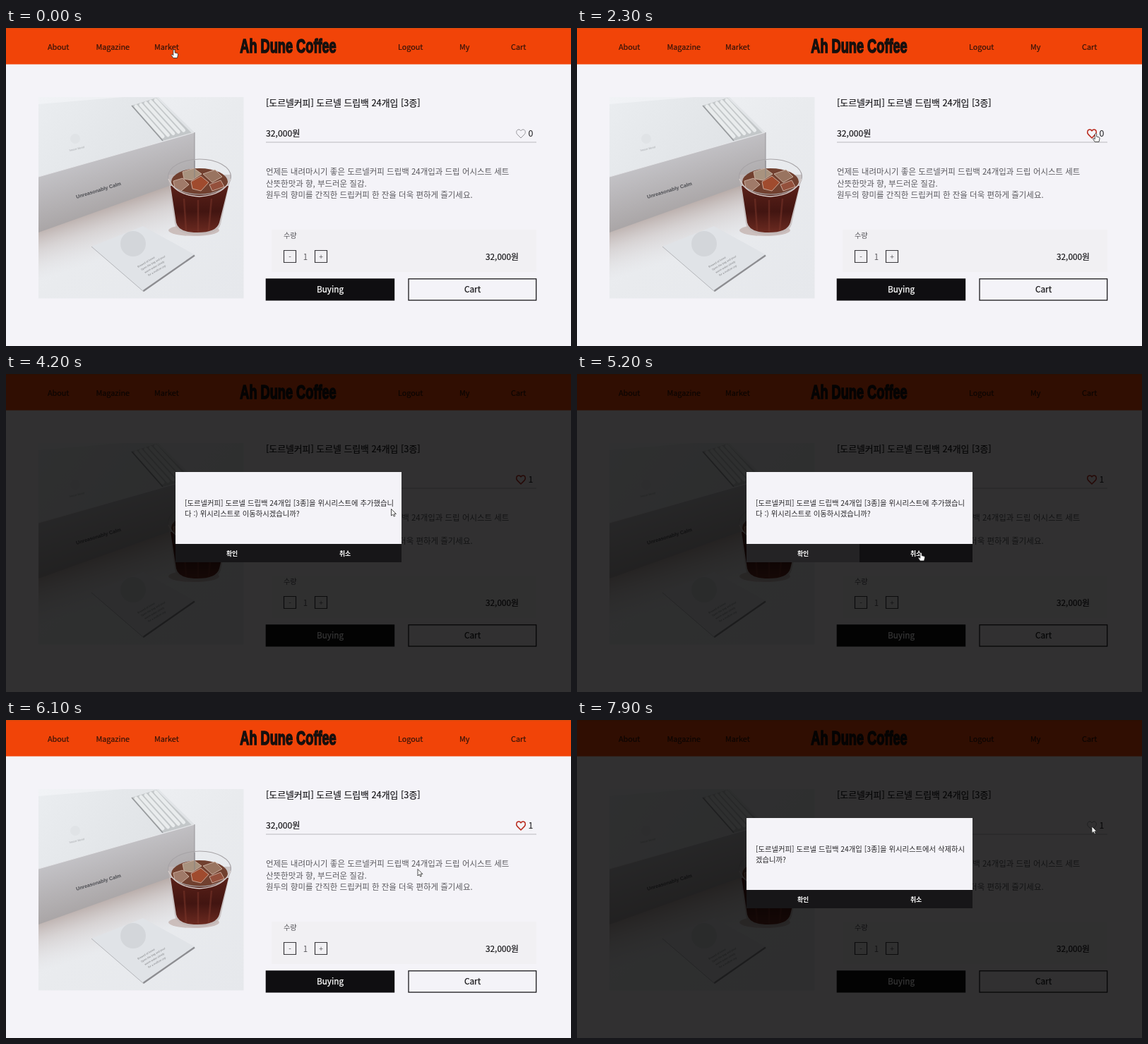
These frames come from a looping animation (800 by 451 pixels, 8 s). An HTML page:

```html
<!DOCTYPE html>
<html lang="ko">
<head>
<meta charset="utf-8">
<title>Coffee shop wishlist</title>
<style>
html, body { margin: 0; width: 100%; height: 100%; overflow: hidden; background: #f4f3f8; }
svg { display: block; width: 800px; height: 451px; }
text { font-family: "Noto Sans CJK KR", "Noto Sans CJK JP", "Noto Sans CJK", sans-serif; fill: #18171a; white-space: pre; }
.mid { text-anchor: middle; }
.nav { font-size: 10.8px; font-weight: 500; fill: #35140a; stroke: #35140a; stroke-width: .2; }
.logo { font: 700 28px "Liberation Sans", sans-serif; fill: #17100e; stroke: #17100e; stroke-width: 1.7; }
.title { font-size: 12.85px; font-weight: 500; stroke: #18171a; stroke-width: .2; }
.price { font-size: 12.2px; font-weight: 500; stroke: #18171a; stroke-width: .2; }
.desc { font-size: 11.48px; font-weight: 300; fill: #5b5a5f; }
.small { font-size: 10.2px; font-weight: 300; fill: #5b5a5f; }
.btn { font-size: 11.8px; font-weight: 500; stroke-width: .25; }
.print { font-family: "Liberation Sans", sans-serif; fill: #4c4d52; }
.msg { font-size: 10.35px; fill: #29282b; }
.choice { font-size: 8.8px; font-weight: 700; fill: #fff; }
</style>
</head>
<body>
<svg viewBox="0 0 800 451">
  <defs>
    <linearGradient id="table" x1="0" y1="0" x2="1" y2="1">
      <stop offset="0" stop-color="#f1f3f6"/><stop offset=".5" stop-color="#e9ebee"/><stop offset="1" stop-color="#e6e8ec"/>
    </linearGradient>
    <linearGradient id="lid" x1="0" y1="0" x2="1" y2=".4">
      <stop offset="0" stop-color="#eaedf0"/><stop offset="1" stop-color="#dfe2e5"/>
    </linearGradient>
    <linearGradient id="front" gradientUnits="userSpaceOnUse" x1="140" y1="180" x2="163" y2="252">
      <stop offset="0" stop-color="#c3c2c6"/><stop offset="1" stop-color="#aaa6a7"/>
    </linearGradient>
    <linearGradient id="shade" gradientUnits="userSpaceOnUse" x1="150" y1="250" x2="172" y2="318">
      <stop offset="0" stop-color="#b3a5a1" stop-opacity=".9"/><stop offset=".4" stop-color="#cbc3c2" stop-opacity=".6"/><stop offset="1" stop-color="#dcdadd" stop-opacity="0"/>
    </linearGradient>
    <linearGradient id="brew" x1="0" y1="0" x2="0" y2="1">
      <stop offset="0" stop-color="#5a2119"/><stop offset=".55" stop-color="#421511"/><stop offset="1" stop-color="#6b2a20"/>
    </linearGradient>
    <clipPath id="crop"><rect x="46" y="98" width="290.500" height="285.500"/></clipPath>
  </defs>

  <rect width="800" height="451" fill="#f4f3f8"/>
  <rect width="800" height="51.500" fill="#f14408"/>
  <rect width="800" height="1.5" fill="#dc4a0c"/>
  <g id="nav"></g>
  <text class="logo mid" transform="translate(399.5 35.2) scale(.65 1)">Ah Dune Coffee</text>

  <g clip-path="url(#crop)">
    <rect x="46" y="98" width="291" height="286" fill="url(#table)"/>
    <path d="M46 289L267 205 252 300 46 372Z" fill="url(#shade)"/>
    <path d="M46 108L178 97H215L267 148 46 211Z" fill="url(#lid)"/>
    <path d="M178 110L213 99 263 149 222 160Z" fill="#c3c7c9"/>
    <path d="M178 110L222 160" stroke="#94979a" stroke-width="1.4"/>
    <g id="bags" stroke="#e9eced" stroke-width="5" stroke-linecap="round"></g>
    <path d="M46 211L267 148V211L46 290Z" fill="url(#front)"/>
    <path d="M46 211L267 148" stroke="#e4e5e8" stroke-width="1.2"/>
    <path d="M267 148V211" stroke="#969498"/>
    <circle cx="98" cy="157" r="7" fill="#e0e3e6"/>
    <text class="print" font-size="4" transform="translate(90 175) rotate(-13)" fill-opacity=".4">house blend</text>
    <text class="print" font-size="7.1" font-weight="700" transform="translate(100 242) rotate(-17)">Unreasonably Calm</text>

    <ellipse cx="266" cy="287" rx="36" ry="8" fill="#a88a82" opacity=".45"/>
    <path d="M229 208L239 277Q242 293 271 293.500 300 293 304 278L319 208Z" fill="#c0b7b7" opacity=".75"/>
    <path d="M233 224L241 276Q244 290 271 290 298 290 302 276L315 224Z" fill="url(#brew)"/>
    <path d="M252 242L255 287M272 244V289M291 242L287 287" stroke="#7d372b" stroke-width="2.500" opacity=".5"/>
    <ellipse cx="274" cy="218" rx="40" ry="19" fill="#71402f"/>
    <g stroke="#d8bfb1" stroke-width=".8">
      <path d="M250 204L266 199 277 207 263 216 252 214Z" fill="#a8937f"/>
      <path d="M279 207L296 201 306 211 292 219Z" fill="#997460"/>
      <path d="M262 218L276 210 287 219 276 231 264 228Z" fill="#a04b2e"/>
      <path d="M237 217L250 213 259 222 248 231 239 227Z" fill="#a07a69"/>
      <path d="M288 222L304 216 309 225 292 231Z" fill="#94503c"/>
    </g>
    <ellipse cx="274" cy="211" rx="44.500" ry="25" fill="none" stroke="#a7a4a7" stroke-width="1.200"/>
    <path d="M230 214Q239 237 274 239 309 237 318 214" fill="none" stroke="#d9cfcd" stroke-width="1.300"/>
    <path d="M267 188V213" stroke="#817f84" stroke-width=".8"/>

    <path d="M121 310L194 281 268 322 195 374Z" fill="#e0e3e7"/>
    <path d="M121 310L195 374" stroke="#b3b5b9"/>
    <path d="M194.500 373L267 322.500" stroke="#8d8d91" stroke-width="2.400"/>
    <circle cx="180" cy="306" r="18" fill="#d3d6da"/>
    <g id="card" class="print" font-size="3.6"></g>
  </g>

  <text class="title" x="368" y="110.800">[도르넬커피] 도르넬 드립백 24개입 [3종]</text>
  <text class="price" x="368" y="154">32,000원</text>
  <path id="heart" d="M729 156L723.700 150.600C721.700 148 723 144 726 144 727.600 144 728.600 145 729 146 729.500 145 730.600 144 732.200 144 735.200 144 736.300 148 734.300 150.600Z" fill="none" stroke-linejoin="round"/>
  <text id="count" class="mid" x="743" y="154" font-size="12.400"></text>
  <path d="M368 162H751" stroke="#b9b8bd"/>
  <text class="desc" x="368" y="208">언제든 내려마시기 좋은 도르넬커피 드립백 24개입과 드립 어시스트 세트</text>
  <text class="desc" x="368" y="224.500">산뜻한맛과 향, 부드러운 질감.</text>
  <text class="desc" x="368" y="241">원두의 향미를 간직한 드립커피 한 잔을 더욱 편하게 즐기세요.</text>

  <rect x="376" y="286" width="375" height="60" fill="#f1f0f3"/>
  <text class="small" x="393" y="298">수량</text>
  <path d="M393.500 315.500H410.500V332.500H393.500ZM437.500 315.500H454.500V332.500H437.500Z" fill="none" stroke="#3c3b3f" stroke-width="1.200"/>
  <text class="small mid" x="402" y="327.500">-</text>
  <text class="desc mid" x="424" y="328.500">1</text>
  <text class="small mid" x="446" y="327.500">+</text>
  <text class="price" x="679" y="328.500" style="font-size:11.8px">32,000원</text>
  <rect x="367.700" y="355.300" width="182.500" height="31.300" fill="#0f0e11"/>
  <text class="btn mid" x="459" y="375" style="fill:#fff;stroke:#fff">Buying</text>
  <rect x="570" y="355.800" width="180.700" height="30.300" fill="none" stroke="#1b1a1d" stroke-width="1.300"/>
  <text class="btn mid" x="660.500" y="375" stroke="#18171a">Cart</text>

  <g id="modal">
    <rect width="800" height="451" fill="#000" opacity=".8"/>
    <rect x="240" y="139" width="320" height="102" fill="#f4f3f8"/>
    <text id="line1" class="msg" x="253" y="187"></text>
    <text id="line2" class="msg" x="253" y="202"></text>
    <rect id="yes" x="240" y="241" width="160" height="26"/>
    <rect id="no" x="400" y="241" width="160" height="26"/>
    <text class="choice mid" x="320" y="257.500">확인</text>
    <text class="choice mid" x="480" y="257.500">취소</text>
  </g>

  <g id="cursor" stroke="#222" stroke-width=".8" stroke-linejoin="round" fill="#fff">
    <path id="arrow" d="M0 0V9.500L2.200 7.500 3.800 10.600 5.300 9.900 3.900 6.900H6.900Z"/>
    <path id="hand" d="M-1.200 1Q0-.8 1.200 1V4.600L4.600 5.400Q5.800 5.900 5.500 7.600L4.500 12H-1.200L-3.900 8Q-3.700 6.600-2.500 7.200L-1.200 8.200Z"/>
  </g>
</svg>
<script>
const LOOP = 8000, STEP = 100;
const $ = id => document.getElementById(id);
const put = (id, markup) => { $(id).innerHTML = markup; };

put('nav', [['About', 59], ['Magazine', 127.5], ['Market', 210], ['Logout', 555], ['My', 642], ['Cart', 715]]
  .map(([word, x]) => `<text class="nav" x="${x}" y="30.5">${word}</text>`).join(''));

put('bags', [0, 1, 2, 3, 4]
  .map(i => `<path d="M${184 + i * 7} ${111 - i * 2.2}L${222 + i * 7.4} ${154 - i * 2.2}"/>`).join(''));

put('card', ['Brewed at home', 'Open the bag and pour', 'warm water slowly', 'for a mellow cup']
  .map((s, i) => `<text transform="translate(${187 + i * 5} ${340 + i * 4}) rotate(-30)" fill-opacity=".5">${s}</text>`).join(''));

const ITEM = '[도르넬커피] 도르넬 드립백 24개입 [3종]을 ';
const ADDED = [ITEM + '위시리스트에 추가했습니', '다 :) 위시리스트로 이동하시겠습니까?'];
const REMOVE = [ITEM + '위시리스트에서 삭제하시', '겠습니까?'];

// time, x, y of the pointer tip
const PATH = [
  [0, 238, 30.5], [400, 238, 30.5], [1200, 735, 152], [1300, 735, 152],
  [1500, 741, 151], [1600, 731, 150], [1700, 731, 150], [1900, 734.5, 149.5],
  [3100, 734.5, 149.5], [3200, 731, 150], [3900, 731, 150], [4500, 360, 233],
  [4600, 360, 233], [5200, 487, 253], [5300, 483, 253], [5700, 483, 253],
  [6500, 683, 170], [6600, 683, 170], [7100, 733, 150.5], [7500, 733, 150.5],
  [7600, 729, 151], [LOOP, 729, 151]
];

function pointer(t) {
  const i = PATH.findIndex(p => p[0] > t);
  const [t0, x0, y0] = PATH[i - 1], [t1, x1, y1] = PATH[i];
  const u = (t - t0) / (t1 - t0), k = u * u * (3 - 2 * u);
  return [x0 + (x1 - x0) * k, y0 + (y1 - y0) * k];
}

const inside = (x, y, l, t, r, b) => x >= l && x < r && y >= t && y < b;

function draw(now) {
  const t = Math.floor(now % LOOP / STEP) * STEP;
  const [x, y] = pointer(t);
  const removing = t >= 7600;
  const open = removing || (t >= 3200 && t < 5300);
  const onYes = open && inside(x, y, 240, 241, 400, 267);
  const onNo = open && inside(x, y, 400, 241, 560, 267);
  const onLink = !open && (inside(x, y, 210, 20, 246, 36) || inside(x, y, 721, 142, 737, 158));
  const hand = onYes || onNo || onLink;
  const liked = t >= 2300 && !removing;

  $('heart').setAttribute('stroke', liked ? '#b9291c' : '#949398');
  $('heart').setAttribute('stroke-width', liked ? 1.5 : 1);
  $('count').textContent = t < 3200 ? '0' : '1';

  $('modal').style.display = open ? '' : 'none';
  const [a, b] = removing ? REMOVE : ADDED;
  $('line1').textContent = a;
  $('line2').textContent = b;
  $('yes').setAttribute('fill', onYes || onNo ? '#242325' : '#171618');
  $('no').setAttribute('fill', onNo ? '#111012' : '#171618');

  $('cursor').setAttribute('transform', `translate(${x} ${y})`);
  $('hand').style.display = hand ? '' : 'none';
  $('arrow').style.display = hand ? 'none' : '';
}

const start = performance.now();
function tick() {
  draw(performance.now() - start);
  requestAnimationFrame(tick);
}
tick();
</script>
</body>
</html>
```
